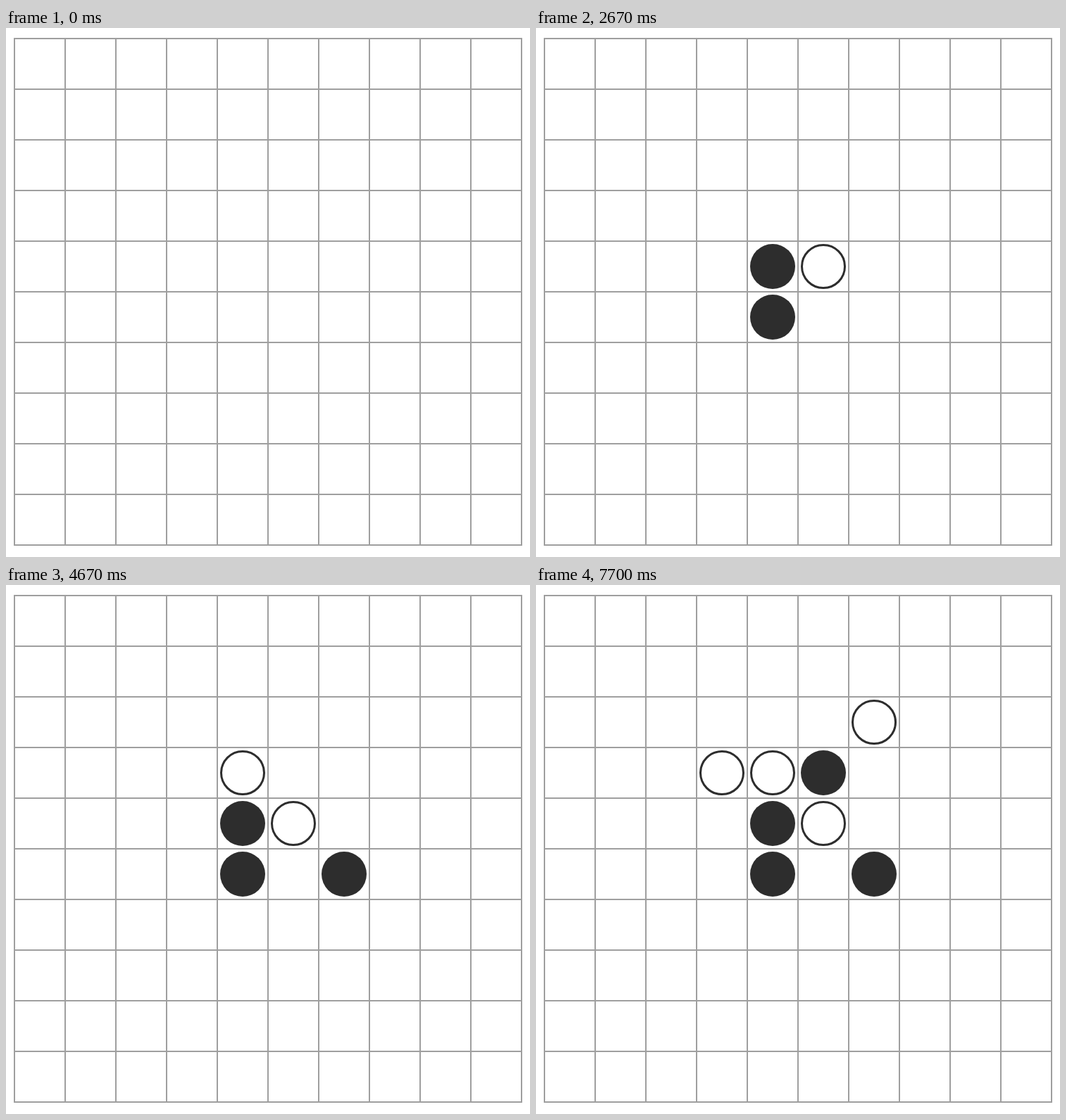
These frames come from a looping animation (744 px wide and 752 px high, 8000 ms). An HTML page:

```html
<!DOCTYPE html>
<html lang="en">
<head>
<meta charset="utf-8">
<title>Board game</title>
<style>
html, body { margin: 0; width: 100%; height: 100%; overflow: hidden; background: #fff; }
svg { display: block; }
</style>
</head>
<body>
<svg id="board" width="744" height="752" viewBox="0 0 744 752"></svg>
<script>
const LOOP = 8000, CELL = 72, LEFT = 12, TOP = 15, COUNT = 10;
const INK = '#2d2d2d', LINE = '#9f9f9f';
const board = document.getElementById('board');

// Moves alternate black and white: [time, column, row]
const moves = [
  [670, 4, 4], [1670, 5, 4], [2670, 4, 5], [3670, 4, 3],
  [4670, 6, 5], [5670, 3, 3], [6700, 5, 3], [7700, 6, 2]
];

function add(tag, attrs) {
  const el = document.createElementNS('http://www.w3.org/2000/svg', tag);
  for (const key in attrs) el.setAttribute(key, attrs[key]);
  return board.appendChild(el);
}

let grid = '';
const size = CELL * COUNT;
for (let i = 0; i <= COUNT; i++) {
  grid += `M${LEFT - 1} ${TOP + i * CELL}h${size + 2}`;
  grid += `M${LEFT + i * CELL} ${TOP - 1}v${size + 2}`;
}
add('path', { d: grid, fill: 'none', stroke: LINE, 'stroke-width': 2 });

const stones = moves.map(([time, col, row], i) => {
  const white = i % 2 === 1;
  const el = add('circle', {
    cx: LEFT + (col + 0.5) * CELL,
    cy: TOP + (row + 0.5) * CELL,
    r: white ? 30.5 : 32,
    fill: white ? '#fff' : INK,
    stroke: white ? INK : 'none',
    'stroke-width': 3
  });
  return { time, el };
});

function render(t) {
  for (const { time, el } of stones) {
    el.setAttribute('visibility', t >= time ? 'visible' : 'hidden');
  }
}

const start = performance.now();
function tick(now) {
  render(Math.max(0, now - start) % LOOP);
  requestAnimationFrame(tick);
}
render(0);
requestAnimationFrame(tick);
</script>
</body>
</html>
```
